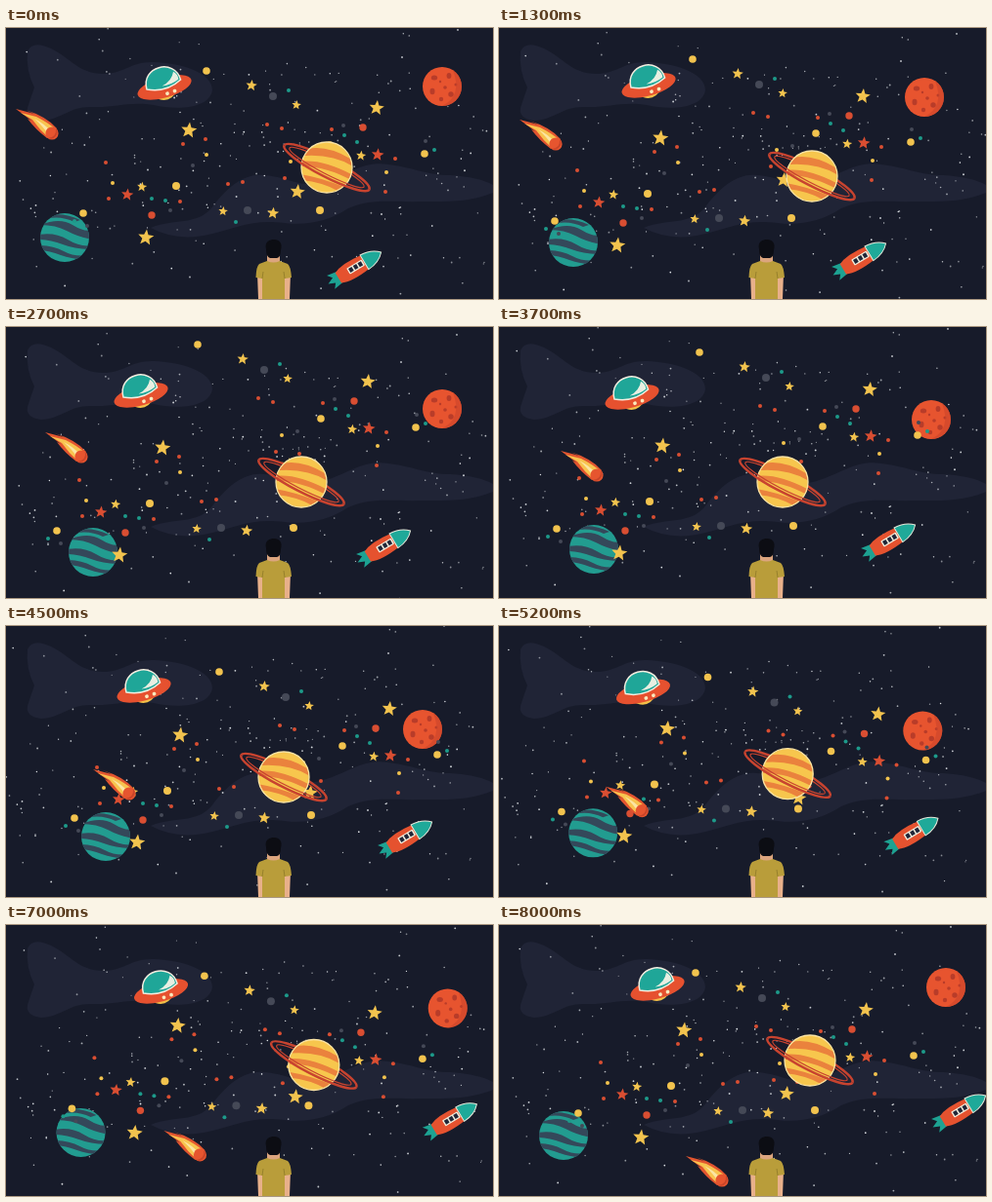
An HTML page for the animation above (8.1 s loop, 498 by 278 pixels).

```html
<!DOCTYPE html>
<html lang="en">
<head>
<meta charset="utf-8">
<title>Night sky</title>
<style>
html, body { margin: 0; width: 100%; height: 100%; overflow: hidden; background: #171b2a; }
svg { display: block; width: 100vw; height: 100vh; }
</style>
</head>
<body>
<svg viewBox="0 0 498 278" preserveAspectRatio="none">
  <defs>
    <clipPath id="globe"><circle r="25"/></clipPath>
    <clipPath id="giant"><circle r="25.5"/></clipPath>
  </defs>
  <rect width="498" height="278" fill="#171b2a"/>
  <g fill="#202436">
    <path d="M22 24Q27 12 46 21C66 31 75 47 99 47C121 47 128 34 151 35C178 36 211 45 211 64C208 82 177 85 151 79C126 75 111 82 88 81C65 80 57 94 36 95Q20 93 22 82L29 61Q20 43 22 24Z"/>
    <path d="M148 205C172 195 194 203 210 185C226 163 244 149 263 151C291 153 300 165 325 158C353 149 366 136 391 140C421 144 429 151 454 151Q484 153 498 161V169C473 179 451 178 425 178C395 179 375 174 350 185C330 198 308 203 285 200C250 196 237 205 211 211Q176 220 148 205Z"/>
  </g>
  <g id="sky" fill="#e9edf0"></g>

  <g id="mars">
    <circle r="20" fill="#e7542f"/>
    <g fill="#b83c29">
      <ellipse cx="-8" cy="-9" rx="3.2" ry="2.5"/>
      <ellipse cx="7" cy="-11" rx="2.4" ry="3"/>
      <ellipse cx="-10" cy="5" rx="2.5" ry="3.3"/>
      <circle cx="3" cy="1" r="1.8"/>
      <circle cx="9" cy="8" r="2.7"/>
      <circle cx="-1" cy="13" r="2.2"/>
      <circle cx="14" cy="-2" r="1.5"/>
      <circle cx="-2" cy="-5" r="1.2"/>
    </g>
    <path d="M11-16.7A20 20 0 0 1 0 20Q21 10 11-16.7Z" fill="#cc452b" opacity=".6"/>
  </g>

  <g id="teal">
    <circle r="25" fill="#229c90"/>
    <g clip-path="url(#globe)" fill="#34485a">
      <path d="M-25-13Q-5-21 8-13T28-8V2Q13-1 2-7T-25-13Z"/>
      <path d="M-27-3Q-10-6 3 2T28 8V12Q11 12-2 7T-27 2Z"/>
      <path d="M-27 8Q-12 8-1 14T24 18V22Q9 23-4 18T-27 13Z"/>
      <path d="M-16-23Q0-26 16-18L10-16Q-2-22-16-20Z"/>
    </g>
  </g>

  <g id="left"></g>
  <g id="right"></g>

  <g id="saturn">
    <g transform="rotate(27.5)" fill="none" stroke="#c8432f">
      <path d="M-49 0A49 9.5 0 0 1 49 0" stroke-width="2.4"/>
      <path d="M-43 0A43 6.5 0 0 1 43 0" stroke-width="1.3"/>
    </g>
    <circle r="26" fill="#f7c64d"/>
    <g clip-path="url(#giant)" fill="#ea823d">
      <path d="M-19-19Q0-23 24-9L27-1Q6-14-23-12Z"/>
      <path d="M-27-6Q-5-9 27 8V14Q-2-2-27-1Z"/>
      <path d="M-27 7Q-6 10 20 21L13 25Q-4 15-27 13Z"/>
    </g>
    <circle r="26" fill="none" stroke="#fae3a4" stroke-width="1.3"/>
    <g transform="rotate(27.5)" fill="none" stroke="#c8432f">
      <path d="M-49 0A49 9.5 0 0 0 49 0" stroke-width="2.5"/>
      <path d="M-43 0A43 6.5 0 0 0 43 0" stroke-width="1.3"/>
    </g>
  </g>

  <g id="ufo">
    <g transform="rotate(-16)">
      <path d="M-14 10Q0 24 12 10Z" fill="#f3bf48"/>
      <ellipse cy="4" rx="28.5" ry="10.5" fill="#e6512f"/>
      <path d="M-18 1C-18-23 18-23 18 1Q0 10-18 1Z" fill="#1fa698" stroke="#f2eee0" stroke-width="1.5"/>
      <path d="M-2 2Q9 0 13-9Q17-5 16 0Q7 4-2 2Z" fill="#e8efe2"/>
      <g fill="#fae9bd">
        <circle cx="1" cy="11" r="1.9"/>
        <circle cx="9" cy="10.5" r="1.9"/>
      </g>
    </g>
  </g>

  <g id="comet">
    <path d="M-37-25L-18-20L-27-24Q-5-17 5-5L-5 5Q-17-4-25-15L-21-13Z" fill="#e2552f"/>
    <path d="M-32-21L-16-17Q-4-11 4-4L-4 4Q-13-4-20-14Z" fill="#f8c44f"/>
    <path d="M-18-15Q-8-10-1-2L-4 1Q-9-7-18-15Z" fill="#fbe5a4"/>
    <circle r="6.6" fill="#e6552f"/>
    <path d="M4-5A6.6 6.6 0 0 1-4 5Q5 4 4-5Z" fill="#c84429"/>
  </g>

  <g id="rocket">
    <g transform="rotate(-31)">
      <path d="M-17-6L-29-8L-25-3L-32 0L-25 3L-29 8L-17 6Z" fill="#1da292"/>
      <path d="M-20-6Q-10-11 12-8L13 8Q-10 11-20 6Z" fill="#e5522f"/>
      <path d="M11-8.5Q24-8 31 0Q24 8 11 8.5Z" fill="#1fa999" stroke="#e7eadc" stroke-width="1"/>
      <rect x="-8" y="-4" width="18" height="7" rx="1" fill="#f2eddc"/>
      <g fill="#202638">
        <rect x="-6.5" y="-2.8" width="4" height="4.6"/>
        <rect x="-1" y="-2.8" width="4" height="4.6"/>
        <rect x="4.5" y="-2.8" width="4" height="4.6"/>
      </g>
    </g>
  </g>

  <g id="man">
    <path d="M257 252H264V278H258ZM284 252H291L290 278H285Z" fill="#e8b08a"/>
    <path d="M267 230H280V242H267Z" fill="#dca57e"/>
    <path d="M267 239Q273.500 242 280 239L288 242Q291 244 292 256L285 257V278H262V257L255.500 256Q256 244 259 242Z" fill="#b99d3a"/>
    <path d="M262 257L263 250M285 257L284 250" stroke="#8f7929" stroke-width=".8" fill="none"/>
    <path d="M266 227C264 219 270 217 274 217C280 217 283 221 281 228Q281 235 277 236H270Q266 235 266 227Z" fill="#0c0d13"/>
  </g>
</svg>
<script>
const LOOP = 8100, STEP = 100;
const TIMES = [0, 1300, 2700, 3700, 4500, 6000, 8000];
const YELLOW = '#f2c34e', RED = '#d94e32', TEAL = '#1d9a8a', GREY = '#454957';
const $ = id => document.getElementById(id);

// x and y of each moving part at TIMES
const PATHS = {
  ufo:    [[161, 152, 137, 135, 140, 153, 161], [57, 55, 66, 68, 62, 66, 61]],
  comet:  [[47, 58, 77, 100, 126, 169, 228], [108, 119, 133, 152, 172, 210, 262]],
  rocket: [[357, 369, 387, 399, 409, 438, 471], [246, 237, 225, 219, 217, 208, 191]],
  mars:   [[446, 435, 446, 442, 426, 445, 457], [60, 71, 84, 95, 106, 103, 64]],
  teal:   [[60, 76, 89, 97, 102, 87, 66], [215, 220, 231, 228, 216, 211, 216]],
  saturn: [[328, 320, 302, 290, 284, 309, 318], [143, 152, 159, 159, 155, 148, 139]],
  left:   [[0, -22, -27, -20, -9, -21, 2], [0, 8, 19, 17, 7, -4, 3]],
  right:  [[0, -7, -9, 0, 13, 1, -4], [0, -12, -26, -18, 3, 10, 5]],
  sky:    [[0, 6, -1, -3, -14, -6, 0], [0, 4, 6, 0, -2, 2, 0]]
};

function add(parent, tag, attrs) {
  const el = document.createElementNS('http://www.w3.org/2000/svg', tag);
  for (const k in attrs) el.setAttribute(k, attrs[k]);
  parent.append(el);
}

function dots(id, fill, items) {
  for (const [cx, cy, r = 2] of items) add($(id), 'circle', { cx, cy, r, fill });
}

function stars(id, fill, items) {
  for (const [x, y, r] of items) {
    const points = Array.from({ length: 10 }, (_, i) => {
      const a = i * Math.PI / 5 - Math.PI / 2 + 0.12, d = i % 2 ? r * 0.44 : r;
      return (x + d * Math.cos(a)).toFixed(2) + ',' + (y + d * Math.sin(a)).toFixed(2);
    });
    add($(id), 'polygon', { points: points.join(' '), fill });
  }
}

function fillSky() {
  let seed = 71;
  const rnd = () => (seed = seed * 16807 % 2147483647) / 2147483647;
  for (let i = 0; i < 235; i++) {
    const cx = 14 + rnd() * 480;
    const spread = (rnd() + rnd() - 1) * 150;
    const cy = i % 3 ? 135 + spread : rnd() * 278;
    add($('sky'), 'circle', {
      cx: cx.toFixed(1), cy: cy.toFixed(1), r: (0.6 + rnd() * 0.35).toFixed(2),
      opacity: (0.5 + rnd() * 0.45).toFixed(2)
    });
  }
}

fillSky();

dots('left', GREY, [[247, 187, 4], [191, 141], [168, 187], [83, 203]]);
dots('left', TEAL, [[149, 175], [163, 177], [235, 199], [70, 198]]);
dots('left', RED, [[102, 138], [181, 119], [204, 114], [105, 175], [227, 160], [242, 158], [178, 178], [149, 192, 3.7]]);
dots('left', YELLOW, [[79, 190, 3.8], [174, 162, 4], [321, 187, 4], [205, 130], [109, 159]]);
stars('left', YELLOW, [[187, 105, 8.5], [139, 163, 5.3], [143, 215, 8.5], [222, 188, 5], [273, 190, 6.3]]);
stars('left', RED, [[124, 171, 6.5]]);

dots('right', GREY, [[273, 70, 4], [345, 100], [429, 116], [307, 133]]);
dots('right', TEAL, [[289, 64], [346, 110], [359, 117], [438, 125]]);
dots('right', RED, [[267, 99], [282, 103], [333, 104], [365, 102, 3.7], [398, 134], [388, 168], [285, 154], [309, 156]]);
dots('right', YELLOW, [[205, 44, 3.8], [331, 120, 3.8], [428, 129, 3.8], [389, 148], [291, 137]]);
stars('right', YELLOW, [[251, 59, 6], [297, 79, 5], [379, 82, 8], [363, 131, 5.3], [298, 168, 8]]);
stars('right', RED, [[380, 130, 6.7]]);

// Smooth cubic through uneven keys
function curve(v, t) {
  const last = TIMES.length - 1;
  let i = 0;
  while (i < last - 1 && t >= TIMES[i + 1]) i++;
  const slope = k => {
    const a = Math.max(0, k - 1), b = Math.min(last, k + 1);
    return (v[b] - v[a]) / (TIMES[b] - TIMES[a]);
  };
  const h = TIMES[i + 1] - TIMES[i], u = Math.min(1, (t - TIMES[i]) / h);
  const w = 1 - u;
  return w * w * ((1 + 2 * u) * v[i] + u * h * slope(i)) +
         u * u * ((3 - 2 * u) * v[i + 1] - w * h * slope(i + 1));
}

function draw(t) {
  for (const id in PATHS) {
    const [x, y] = PATHS[id].map(v => curve(v, t).toFixed(2));
    $(id).setAttribute('transform', `translate(${x} ${y})`);
  }
}

const start = performance.now();
function tick() {
  const t = (performance.now() - start) % LOOP;
  draw(Math.floor(t / STEP) * STEP);
  requestAnimationFrame(tick);
}
tick();
</script>
</body>
</html>
```
